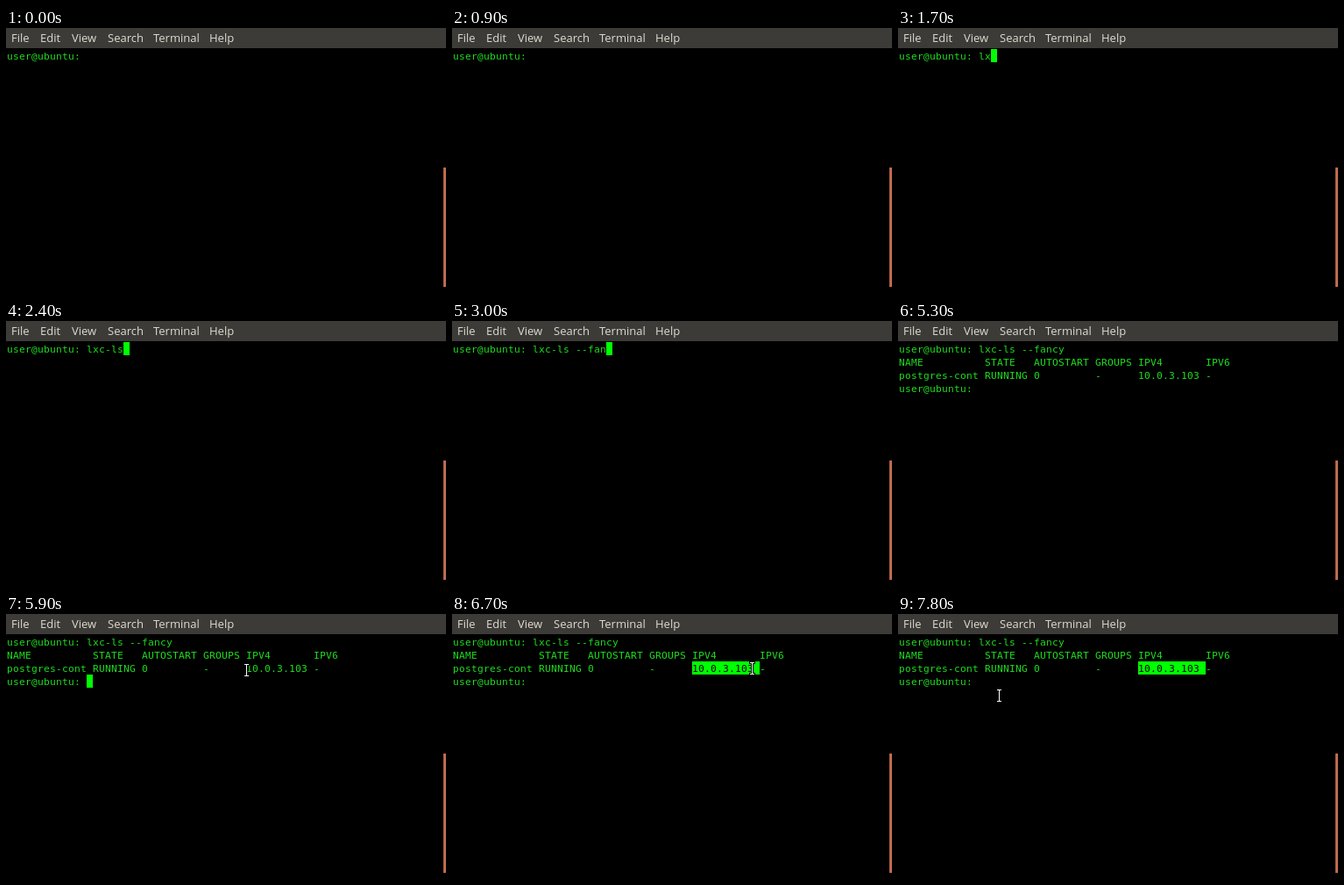
These frames come from a looping animation (502 by 302 pixels, 8 s). An HTML page:

```html
<!DOCTYPE html>
<html lang="en">
<head>
<meta charset="utf-8">
<title>Terminal</title>
<style>
  html, body { margin: 0; width: 100%; height: 100%; overflow: hidden; background: #000; }
  svg { display: block; }
  text { white-space: pre; }
  #menu { font: 13px "Open Sans", "Noto Sans", sans-serif; fill: #dfdbd2; }
  #terminal { font: 11.3px "DejaVu Sans Mono", monospace; letter-spacing: calc(7px - 0.602em); fill: #0f0; }
  #lines { fill: #1edc1e; }
  #selectedText { fill: #000; }
  #pointer path { fill: none; stroke: #000; stroke-width: 3; stroke-linecap: square; }
  #pointer path + path { stroke: #fff; stroke-width: 1; stroke-linecap: butt; }
</style>
</head>
<body>
<svg width="502" height="302" viewBox="0 0 502 302">
  <rect width="502" height="302"/>
  <rect width="502" height="23" fill="#3c3b37"/>
  <g id="menu">
    <text x="6" y="16">File</text>
    <text x="39" y="16">Edit</text>
    <text x="75" y="16">View</text>
    <text x="116" y="16">Search</text>
    <text x="168" y="16">Terminal</text>
    <text x="232" y="16">Help</text>
  </g>
  <rect x="499" y="159" width="3" height="136" fill="#bf6a4e"/>
  <g id="terminal">
    <g id="lines"></g>
    <rect id="caret" width="7" height="15"/>
    <rect id="selection" height="15"/>
    <text id="selectedText"></text>
  </g>
  <g id="pointer">
    <path d="M-2-6.5H2M0-6.5V6.5M-2 6.5H2"/>
    <path d="M-2.5-6.5H2.5M0-6.5V6.5M-2.5 6.5H2.5"/>
  </g>
</svg>
<script>
const LOOP = 8000, STEP = 100;
const CELL = 7, ROW = 15, LEFT = 1, TOP = 24, BASELINE = 12;
const PROMPT = "user@ubuntu: ", COMMAND = "lxc-ls --fancy";
const ADDRESS = "10.0.3.103 ", ADDRESS_COL = 39, ADDRESS_ROW = 2;

const TYPE_START = 1700, TYPE_END = 3500, OUTPUT_AT = 4000;
const BLINK = 600, FIRST_BLINK = 300, HOLD_START = 1400, HOLD_END = 4500;

const tableRow = (name, state, auto, groups, v4, v6) =>
  name.padEnd(14) + state.padEnd(8) + auto.padEnd(10) + groups.padEnd(7) + v4.padEnd(11) + v6;
const OUTPUT = [
  tableRow("NAME", "STATE", "AUTOSTART", "GROUPS", "IPV4", "IPV6"),
  tableRow("postgres-cont", "RUNNING", "0", "-", ADDRESS, "-"),
  PROMPT
];

// The pointer enters, drags over the address, drops away and crosses to the left.
const ENTRY = { x: 281, y: 132 };
const APPROACH = { begin: 5500, end: 5900, x: 274, y: 64 };
const DRAG = { begin: 6000, end: 6700, x: 342, y: 62 };
const DROP = { begin: 6800, end: 7200, x: 288, y: 159 };
const CROSS = { begin: 7400, end: 7800, x: 115, y: 93 };

const byId = id => document.getElementById(id);
const colX = col => LEFT + col * CELL;
const rowY = row => TOP + row * ROW;
const progress = (t, begin, end) => Math.min(1, Math.max(0, (t - begin) / (end - begin)));

function place(element, attributes) {
  for (const name in attributes) element.setAttribute(name, attributes[name]);
}

const lines = Array.from({ length: OUTPUT.length + 1 }, (_, row) => {
  const line = document.createElementNS("http://www.w3.org/2000/svg", "text");
  place(line, { x: LEFT, y: rowY(row) + BASELINE });
  return byId("lines").appendChild(line);
});

// Typing starts slowly, speeds up and ends slowly.
function typedCount(t) {
  if (t < TYPE_START) return 0;
  return Math.floor(2 + 2 * progress(t, TYPE_START, 2100)
    + 8 * progress(t, 2100, 3000) + 2 * progress(t, 3000, TYPE_END));
}

// The caret stays lit while keys are pressed; the blink restarts from the last key.
function caretVisible(t) {
  if (t >= HOLD_START && t < HOLD_END) return true;
  const origin = t < HOLD_START ? FIRST_BLINK : TYPE_END;
  return Math.floor((t - origin) / BLINK) % 2 === 0;
}

function pointerAt(t) {
  let { x, y } = ENTRY;
  for (const move of [APPROACH, DRAG, DROP, CROSS]) {
    const p = progress(t, move.begin, move.end);
    x += (move.x - x) * p;
    y += (move.y - y) * p;
  }
  return { x: Math.round(x), y: Math.round(y) };
}

function selectedCells(t) {
  if (t <= DRAG.begin) return 0;
  const dragged = pointerAt(Math.min(t, DRAG.end)).x - colX(ADDRESS_COL);
  return Math.min(ADDRESS.length, Math.ceil(dragged / CELL) + 1);
}

function draw(t) {
  const done = t >= OUTPUT_AT, typed = typedCount(t);
  lines[0].textContent = PROMPT + COMMAND.slice(0, typed);
  OUTPUT.forEach((text, i) => lines[i + 1].textContent = done ? text : "");

  place(byId("caret"), {
    x: colX(PROMPT.length + (done ? 0 : typed)),
    y: rowY(done ? OUTPUT.length : 0),
    opacity: Number(caretVisible(t))
  });

  const cells = selectedCells(t), x = colX(ADDRESS_COL), y = rowY(ADDRESS_ROW);
  place(byId("selection"), { x, y, width: cells * CELL });
  place(byId("selectedText"), { x, y: y + BASELINE });
  byId("selectedText").textContent = ADDRESS.slice(0, cells);

  const pointer = pointerAt(t);
  place(byId("pointer"), {
    transform: `translate(${pointer.x + 0.5} ${pointer.y})`,
    opacity: Number(t >= APPROACH.begin)
  });
}

const start = performance.now();
function tick() {
  const t = (performance.now() - start) % LOOP;
  draw(Math.floor(t / STEP) * STEP);
  requestAnimationFrame(tick);
}
tick();
</script>
</body>
</html>
```
